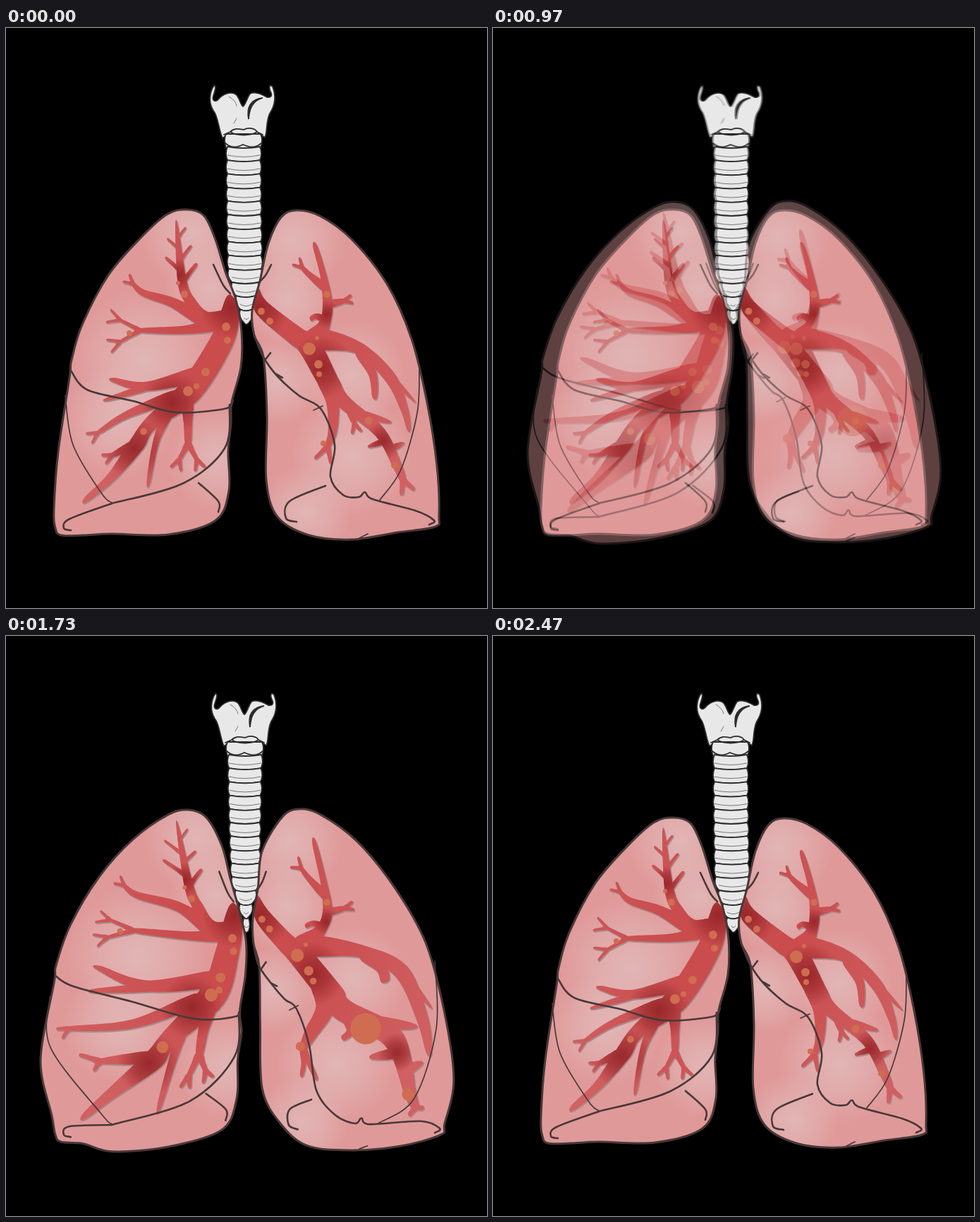
An HTML page for the animation above (2.51 s loop, 682 px wide and 821 px high).

```html
<!DOCTYPE html>
<html lang="en">
<head>
<meta charset="utf-8">
<title>Breathing lungs</title>
<style>
html, body { margin: 0; width: 100%; height: 100%; overflow: hidden; background: #000; }
svg { position: absolute; left: 0; top: 0; width: 682px; height: 821px; background: #000; }
#full { animation: breathe 2510ms linear infinite; }
@keyframes breathe {
  0%, 32.3% { opacity: 0; }
  47.4%, 69.1% { opacity: 1; }
  84.1%, 100% { opacity: 0; }
}
.line { fill: none; stroke: #493838; stroke-width: 2.6; stroke-linecap: round; stroke-linejoin: round; }
.thin { stroke-width: 1.7; }
.edge { stroke-width: 3; }
.bone { fill: #e8e8e8; stroke: #2c2c2e; stroke-width: 1.8; stroke-linejoin: round; }
.ink { fill: none; stroke: #2c2c2e; stroke-width: 1.8; stroke-linecap: round; }
.faint { stroke: #77777a; stroke-width: 1; }
.solid { fill: #2c2c2e; }
</style>
</head>
<body>
<svg id="rest" viewBox="0 0 682 821"></svg>
<svg id="full" viewBox="0 0 682 821"></svg>
<script>
const parse = s => s.split(' ').map(p => p.split(',').map(Number));
const r1 = n => Math.round(n * 10) / 10;
const mix = (a, b, t) => a + (b - a) * t;

// Smooth path through points
function spline(pts, closed) {
  const n = pts.length;
  const at = i => closed ? pts[(i + n) % n] : pts[Math.max(0, Math.min(n - 1, i))];
  let d = `M${r1(pts[0][0])} ${r1(pts[0][1])}`;
  for (let i = 0; i < (closed ? n : n - 1); i++) {
    const [a, b, c, e] = [at(i - 1), at(i), at(i + 1), at(i + 2)];
    const ctrl = k => [b[k] + (c[k] - a[k]) / 6, c[k] - (e[k] - b[k]) / 6, c[k]];
    const y = ctrl(1);
    d += 'C' + ctrl(0).map((x, k) => `${r1(x)} ${r1(y[k])}`).join(' ');
  }
  return d + (closed ? 'Z' : '');
}

// Outline of a tapered tube along [x, y, width] points
function tube(pts) {
  const n = pts.length - 1, left = [], right = [];
  pts.forEach(([x, y, w], i) => {
    const a = pts[Math.max(0, i - 1)], b = pts[Math.min(n, i + 1)];
    const t = Math.atan2(b[1] - a[1], b[0] - a[0]);
    const dx = w / 2 * Math.sin(t), dy = w / 2 * Math.cos(t);
    left.push([x + dx, y - dy]);
    right.unshift([x - dx, y + dy]);
  });
  return spline([...left, ...right], true);
}

function twig([x, y], angle, len, w) {
  const end = [x + len * Math.cos(angle), y + len * Math.sin(angle), w * .6];
  return [[x, y, w], [mix(x, end[0], .5), mix(y, end[1], .5), w * .85], end];
}

// Long twigs split once more, at a shorter length
function fork(p, angle, len, w) {
  return [-.5, .5].flatMap(turn => {
    const t = twig(p, angle + turn, len, w);
    return [t, ...(len > 24 ? fork(t[2], angle + turn * .7, len * .6, w * .75) : [])];
  });
}

// "startWidth,endWidth,forkLength,twigCount x,y[,width] ..."
function limb(s) {
  const [[w0, w1, len = 0, count = 0], ...raw] = parse(s), n = raw.length - 1;
  const pts = raw.map(([x, y, w], i) => [x, y, w ?? mix(w0, w1, i / n)]);
  const [a, b] = pts.slice(-2), angle = Math.atan2(b[1] - a[1], b[0] - a[0]);
  const tubes = [pts];
  if (len) tubes.push(...fork(b, angle, len, w1));
  for (let i = 0; i < count; i++) {
    const t = i / count, from = [mix(a[0], b[0], t), mix(a[1], b[1], t)];
    tubes.push(twig(from, angle + (i % 2 ? -.75 : .75), mix(32, 14, t), mix(7, 3, t)));
  }
  return tubes;
}

// Inhaling drags every point along with the nearby landmarks
function inhale({ landmarks, swell: [sx, sy, size, r] }) {
  const marks = parse(landmarks);
  return ([x, y, w = 0]) => {
    let sum = 0, dx = 0, dy = 0;
    for (const [mx, my, ax, ay] of marks) {
      const k = ((x - mx) ** 2 + (y - my) ** 2 + 4) ** -1.6;
      sum += k; dx += k * ax; dy += k * ay;
    }
    const grow = 1 + size * Math.exp(-((x - sx) ** 2 + (y - sy) ** 2) / r ** 2);
    return [x + dx / sum, y + dy / sum, w * grow, grow];
  };
}

function glow(id, color, o) {
  const stop = (at, k) => `<stop offset="${at}" stop-color="${color}" stop-opacity="${o * k}"/>`;
  return `<radialGradient id="${id}">${stop(0, 1)}${stop(.5, .6)}${stop(1, 0)}</radialGradient>`;
}

function lung(id, l, move) {
  const path = (s, closed) => spline(parse(s).map(move), closed);
  const strokes = (list, cls) => list.map(s => `<path class="line ${cls}" d="${path(s)}"/>`).join('');
  const spots = (s, paint) => parse(s).map(([x, y, r]) => {
    const [cx, cy, , grow = 1] = move([x, y]);
    return `<circle cx="${cx}" cy="${cy}" r="${paint ? r : r * grow ** 2}" fill="${paint || '#cf6d51'}"/>`;
  }).join('');
  const edge = path(l.edge, true);
  const tree = l.limbs.flatMap(limb).map(t => tube(t.map(move))).join('');
  return `<clipPath id="${id}e"><path d="${edge}"/></clipPath>
    <clipPath id="${id}t"><path d="${tree}"/></clipPath>
    ${glow(id + 'pale', '#e2bcbc', .8)}${glow(id + 'dark', '#8f2024', .85)}
    <radialGradient id="${id}red" gradientUnits="userSpaceOnUse" cx="337" cy="430" r="300">
      <stop offset=".3" stop-color="#ca4c4d"/><stop offset="1" stop-color="#d06062"/></radialGradient>
    <g clip-path="url(#${id}e)">
      <path d="${edge}" fill="#e09999"/>${spots(l.pale, `url(#${id}pale)`)}
      <path d="${tree}" fill="#a88786" stroke="#a88786" transform="translate(1 1.5)"/>
      <g clip-path="url(#${id}t)"><rect width="682" height="821" fill="url(#${id}red)"/>${spots(l.dark, `url(#${id}dark)`)}</g>
      ${spots(l.dots)}
    </g>
    <path class="line edge" d="${edge}"/>${strokes(l.lines, '')}${strokes(l.thin, 'thin')}`;
}

const ink = (d, cls = '') => `<path class="ink ${cls}" d="${d}"/>`;

function larynx(dx) {
  const body = 'M295 81C288 92 287 106 294 117C301 125 301 143 307 156L314 151L361 151L367 155C371 148 368 134 374 121C382 109 383 96 378 83C374 79 372 83 375 90C378 96 376 99 370 98C360 92 352 90 346 93C341 100 340 108 336 111C332 108 331 98 326 94C318 89 307 94 301 101C296 106 292 102 294 96C295 91 300 83 295 81Z';
  return `<g transform="translate(${dx} 0)"><path class="bone" d="${body}"/>
    <path class="bone" d="M312 150Q308 158 312 170L361 170Q365 158 361 150Z"/>
    ${ink('M364 99C346 101 341 113 344 129C345 113 350 103 364 99Z', 'solid')}
    ${ink('M316 97Q325 102 327 110M327 128L323 135', 'faint')}
    ${ink('M309 151L318 147C324 141 331 143 337 144C344 140 353 142 356 147L364 151M318 147C327 153 347 153 356 147')}
    ${ink('M311 163C320 171 328 169 336 165C345 169 353 171 362 163')}</g>`;
}

// Rings narrow towards the fork, more so when the lungs are full
function trachea(dx) {
  const step = 19.2, count = 13;
  const side = (y, s) => {
    const k = (y - 168) / (step * count);
    const half = 23 - 3 * dx * k - 20 * Math.max(0, (y - 345) / 72);
    return r1(337 + dx * (1 - k) + 4 * k * k + s * Math.max(3, half));
  };
  let out = '';
  for (let i = 0; i < count; i++) {
    const y = 168 + step * i, b = y + step;
    const [l, r, bl, br] = [side(y, -1), side(y, 1), side(b, -1), side(b, 1)];
    const m = (l + r) / 2;
    out += `<path class="bone" d="M${l} ${y}Q${m} ${y + 4} ${r} ${y}Q${r + 4} ${y + 10} ${br} ${b}Q${m} ${b + 4} ${bl} ${b}Q${l - 4} ${y + 10} ${l} ${y}Z"/>`;
    out += ink(`M${bl} ${y + 12}Q${m} ${y + 17} ${br} ${y + 12}`, 'faint');
  }
  return out;
}

const left = {
  edge: '256,257 280,265 296,297 311,345 326,385 334,430 333,480 320,530 319,560 315,600 316,655 297,697 230,717 150,716 110,718 78,718 70,708 68,680 74,600 90,495 93,470 108,420 145,350 190,298 228,264',
  landmarks: '256,257,2,-11 296,297,10,0 332,405,3,0 330,500,6,0 318,560,15,0 315,655,11,0 230,717,0,6 78,718,0,-2 74,600,-25,0 93,475,-22,-4 125,385,-15,-9 190,298,-10,-10 312,423,9,5 258,514,33,-6 253,377,10,-5 117,581,-42,-18 152,498,-20,-28 150,673,0,19 202,643,15,24 165,357,-13,-9 132,463,-20,-20 195,571,27,11',
  swell: [190, 580, .3, 110],
  limbs: [
    '28,4,0,5 312,415 280,412,24 262,388,15 250,360,13 242,281',
    '18,5,14 278,412 235,388 195,375 180,362',
    '18,6,32 300,418 255,427 190,428',
    '8,7 317,380 318,402,26 305,445,33 260,515,34 205,560,20 185,590,22 150,635,13 113,668',
    '20,6 278,488 200,507 152,498', '9,5 205,507 145,525',
    '15,5,16 240,520 170,548 130,573',
    '14,6,14 192,585 150,605',
    '13,5 230,545 213,585 202,643',
    '16,8,26 257,528 258,560 258,588'
  ],
  pale: '195,470,100 160,555,80 265,290,75 290,370,65 300,610,70',
  dark: '320,395,45 235,530,45 182,595,45 245,350,24',
  dots: '312,423,6 314,442,5 283,487,6 258,514,7 270,507,4 253,377,5 244,361,3 175,432,4 195,571,5',
  lines: [
    '92,485 115,512 180,528 240,544 310,539 322,527',
    '150,673 250,645 310,595 317,533',
    '150,673 90,695 82,708 92,711', '273,644 301,670 301,685', '294,335 308,364 318,376'
  ],
  thin: ['84,520 95,590 135,658 150,672']
};

const right = {
  edge: '412,258 445,266 490,299 540,362 575,440 597,530 611,620 614,690 608,706 555,714 490,724 430,718 385,692 369,640 370,550 365,466 352,435 349,400 360,358 372,305 390,268',
  landmarks: '412,258,3,-13 515,328,13,-6 575,440,20,-6 586,485,22,-22 605,580,32,0 614,690,8,0 490,724,0,4 385,692,4,-2 368,600,-6,0 365,480,-6,2 349,405,1,0 372,305,-9,0 430,454,-17,-2 447,540,-35,-12 466,590,-36,-10 460,645,-20,8 500,664,-5,26 470,515,4,4 514,556,-4,0 542,558,33,-5 551,619,19,30 523,522,15,-34 571,568,29,22 438,308,-1,-16 455,377,0,0 445,620,-19,15',
  swell: [517, 558, 1, 65],
  limbs: [
    '30,6 437,442 452,418,16 456,390,14 450,350,9 438,308',
    '11,5,14 453,368 430,349 420,339', '10,6,12 457,391 480,386', '10,6 453,414 440,408 432,412',
    '28,5 442,440 500,453,17 545,495 565,540 571,568', '17,7 503,457 520,490 523,522', '8,3 545,493 577,526',
    '4,8,20 357,370 362,395,22 410,435,27 430,450,32 460,505,28 480,530,20 530,572,16 555,620,13 563,640',
    '24,7,24 451,490 463,530,18 463,570 456,592',
    '14,6,14 487,533 494,560', '10,5 507,547 542,557', '10,5 541,598 562,588', '8,4 533,586 515,592'
  ],
  pale: '490,605,85 425,685,65 405,300,75 400,385,65 490,490,75 385,500,60',
  dark: '358,395,45 447,480,45 535,585,28 455,405,20',
  dots: '362,401,5 374,415,5 430,454,9 441,439,3 443,476,6 444,490,4 455,377,5 514,556,5.5 551,619,5 450,588,4',
  lines: [
    '352,435 364,464 384,492 415,520 447,540 466,590 460,635 478,661 500,664 509,657 520,667 580,683 607,697 600,703',
    '453,648 402,670 397,694 412,699', '376,335 368,350 358,361', '368,469 375,460', '383,490 392,495'
  ],
  thin: ['586,482 583,545 560,625 530,668', '501,722 513,716', '436,541 449,535']
};

function draw(id, dx, pose) {
  document.getElementById(id).innerHTML = larynx(dx) + trachea(dx) +
    lung(id + 'L', left, pose(left)) + lung(id + 'R', right, pose(right));
}
draw('rest', 0, () => p => p);
draw('full', 2, inhale);
</script>
</body>
</html>
```
